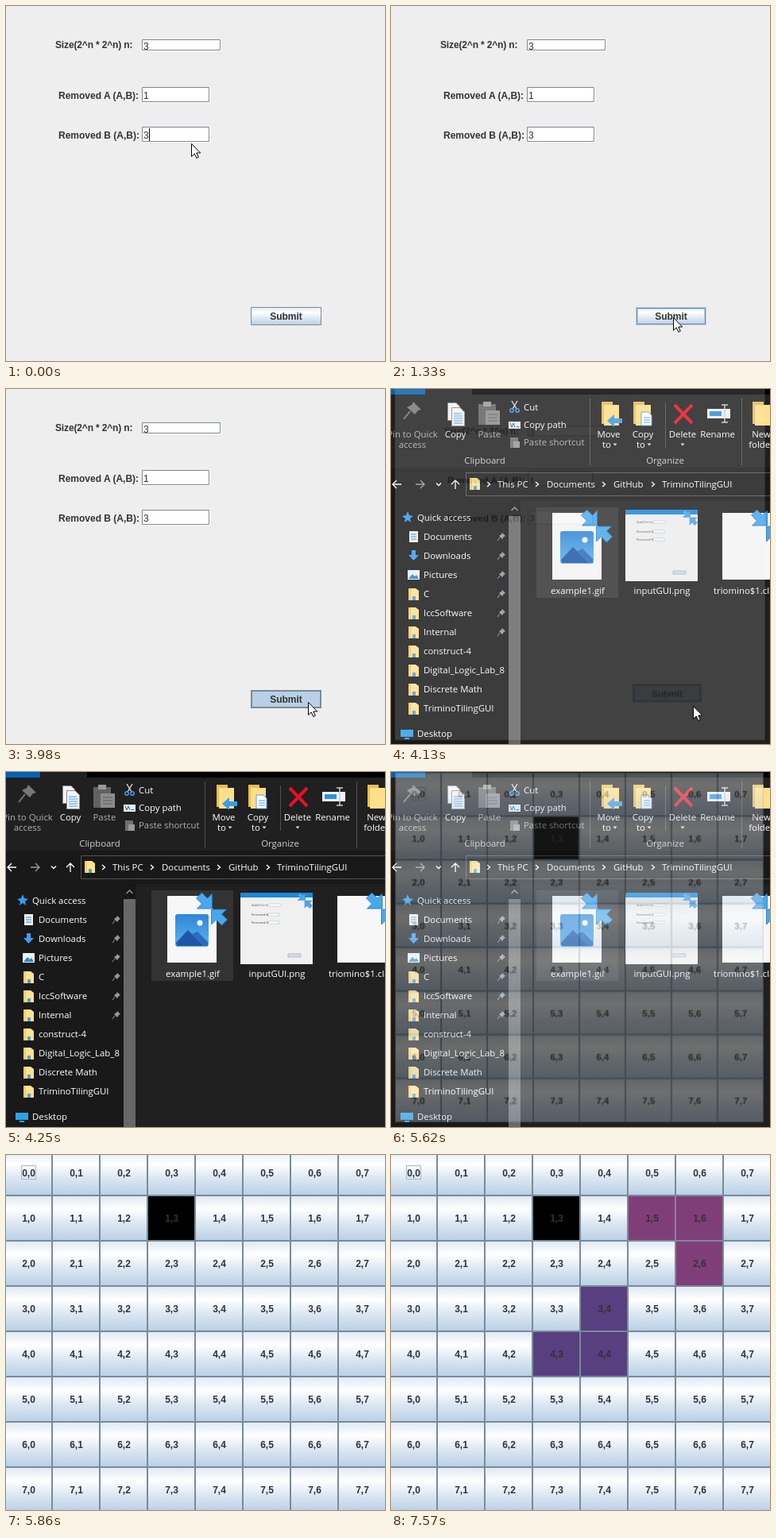
An HTML page for the animation above (8 s loop, 477 by 447 pixels).

```html
<!DOCTYPE html>
<html lang="en">
<head>
<meta charset="utf-8">
<title>Trimino tiling</title>
<style>
html, body { margin: 0; width: 100%; height: 100%; overflow: hidden; background: #202020; }
svg { display: block; }
.ui { font: 11.4px "Open Sans", "Noto Sans", sans-serif; fill: #fff; }
.swing { font: bold 12px "Liberation Sans", Arial, sans-serif; fill: #333; }
.plain { font-weight: normal; }
.mid { text-anchor: middle; }
.dim { fill: #b0b0b0; }
.group { fill: #d0d0d0; }
.tiny { font-size: 4px; fill: #444; }
.line { fill: none; stroke: #fff; stroke-width: 1.3; }
.edge { fill: none; stroke: #7a8a99; }
.glow { fill: none; stroke: #b8cfe5; }

#form, #grid, #caret, #hover, #press, #cursor, .tile { animation: 8s step-end infinite; }
#form { animation-name: close; transform-origin: 205px 165px; }
#grid { animation-name: open; transform-origin: 205px 185px; }
#caret { animation-name: blink; }
#hover { animation-name: hover; }
#press { animation-name: press; }
#cursor { animation-name: move; }
#first { animation-name: first; }
#second { animation-name: second; }

@keyframes close {
  0% { opacity: 1; transform: none; }
  51.625% { opacity: .17; transform: scale(.966); }
  53.125%, 100% { opacity: 0; transform: scale(.966); }
}
@keyframes open {
  0% { opacity: 0; transform: scale(.966); }
  70.25% { opacity: .36; transform: scale(.966); }
  71.75% { opacity: .82; transform: scale(.99); }
  73.25%, 100% { opacity: 1; transform: none; }
}
@keyframes blink {
  0%, 9.75%, 22%, 34.75%, 46.625% { opacity: 1; }
  3.375%, 16.625%, 28%, 41.625%, 49.75%, 100% { opacity: 0; }
}
@keyframes hover {
  0%, 23.5%, 100% { opacity: 0; }
  6.375%, 43.5% { opacity: 1; }
}
@keyframes press {
  0%, 53.125%, 100% { opacity: 0; }
  49.75% { opacity: 1; }
}
@keyframes first { 0% { opacity: 0; } 83.375%, 100% { opacity: 1; } }
@keyframes second { 0% { opacity: 0; } 94.625%, 100% { opacity: 1; } }
@keyframes move {
  0% { transform: translate(233px, 173px); opacity: 1; }
  1.875% { transform: translate(245px, 195px); }
  3.375% { transform: translate(275px, 252px); }
  4.875% { transform: translate(318px, 328px); }
  6.375% { transform: translate(347px, 380px); }
  7.875% { transform: translate(355px, 388px); }
  9.75% { transform: translate(355px, 389px); }
  14.75% { transform: translate(355px, 390px); }
  16.625% { transform: translate(355px, 392px); }
  22% { transform: translate(351px, 383px); }
  23.5% { transform: translate(325px, 325px); }
  25% { transform: translate(280px, 225px); }
  26.5% { transform: translate(235px, 120px); }
  28% { transform: translate(213px, 62px); }
  29.875% { transform: translate(213px, 58px); }
  31.375% { transform: translate(213px, 56px); }
  33.25% { transform: translate(272px, 145px); }
  34.75% { transform: translate(344px, 263px); }
  38.25% { transform: translate(344px, 264px); }
  39.75% { transform: translate(375px, 364px); }
  41.625% { transform: translate(375px, 377px); }
  43.5% { transform: translate(380px, 394px); }
  51.625% { transform: translate(380px, 399px); opacity: 1; }
  53.125%, 100% { transform: translate(380px, 399px); opacity: 0; }
}
</style>
</head>
<body>
<svg width="477" height="447" viewBox="0 0 477 447">
  <defs>
    <linearGradient id="ocean" x2="0" y2="1">
      <stop stop-color="#dde8f3"/>
      <stop offset=".3" stop-color="#fff"/>
      <stop offset=".6" stop-color="#dde8f3"/>
      <stop offset="1" stop-color="#b8cfe5"/>
    </linearGradient>
    <linearGradient id="sky" x2="0" y2="1">
      <stop stop-color="#2f86d6"/>
      <stop offset="1" stop-color="#5ab4f0"/>
    </linearGradient>
    <clipPath id="inner"><path d="M172 43H269V55H172Z"/></clipPath>
    <g id="folder">
      <path d="M0 0H9L13 3V15H0Z" fill="#ffe293"/>
      <path d="M0 0H3V15H0Z" fill="#f3cd6c"/>
      <path d="M5 10H9V15H5Z" fill="#5a9cc8"/>
    </g>
    <g id="bigfolder">
      <path d="M0 0H14V28H0Z" fill="#e9bd55"/>
      <path d="M3 4H22V30H3Z" fill="#ffe08a"/>
    </g>
    <g id="pin" fill="#8f9aa3">
      <path d="M1-5L5-1L3 0L1 3L-3-1L0-3Z"/>
      <path d="M-2 1L-5 5" stroke="#8f9aa3"/>
    </g>
    <path id="arrow" d="M0 0V-19L-6-13L-13-20L-20-13L-13-6L-19 0Z"/>
    <g id="squeeze" fill="#48a8ee" stroke="#1d70b8" stroke-width=".8">
      <use href="#arrow"/>
      <use href="#arrow" transform="translate(-1 1) rotate(180)"/>
    </g>
    <path id="down" d="M-2.500-1.500H2.500L0 1.500Z" fill="#ddd"/>
    <path id="next" class="line" d="M-2-3L1.500 0L-2 3"/>
  </defs>

  <g id="explorer" class="ui">
    <path d="M0 0H477V447H0Z" fill="#202020"/>
    <path d="M102 0H477V7H102Z" fill="#000"/>
    <path d="M0 0H43V7H0Z" fill="#0063b1"/>
    <path d="M0 99H477V141H0ZM0 141H148V447H0Z" fill="#191919"/>
    <path d="M148 141H163V447H148Z" fill="#171717"/>
    <path d="M148 160H163V447H148Z" fill="#686868"/>
    <path d="M151.500 153L155.500 149L159.500 153" class="line" style="stroke:#999"/>
    <path d="M250.500 12V96M441.500 12V96M345.500 17V74" stroke="#505050"/>

    <g fill="#777">
      <path d="M28 16L38 26L34 27L30 32L20 23L26 20Z"/>
      <path d="M24 28L16 38" stroke="#777" stroke-width="2"/>
    </g>
    <g fill="#f4f4f4" stroke="#8b8b8b">
      <path d="M71.500 17.500H82L86.500 22V39.500H71.500Z"/>
      <path d="M76.500 23.500H87L92.500 29V46.500H76.500Z"/>
    </g>
    <path d="M79 31H89M79 34H90M79 37H90M79 40H90M79 43H90" stroke="#4a9ae0"/>
    <path d="M110 19H132V45H110Z" fill="#626262"/>
    <path d="M116 16H126V22H116Z" fill="#999"/>
    <path d="M119 27H137V45H119Z" fill="#8c8c8c"/>
    <path d="M122 32H134M122 36H134M122 40H134" stroke="#5c5c5c"/>
    <path d="M152 15L158 25M159 15L153 25" stroke="#ddd" stroke-width="1.4"/>
    <g fill="none" stroke="#3f9be8" stroke-width="1.5">
      <circle cx="152" cy="27" r="2.200"/><circle cx="159" cy="27" r="2.200"/>
    </g>
    <path d="M148 41H163V50H148Z" fill="#e4eef5"/>
    <path d="M150 43L152 48L154 43L156 48M158 47.500H161" fill="none" stroke="#27628f"/>
    <path d="M150 61H160V74H150Z" fill="#707070"/>
    <path d="M154 66H162V74H154Z" fill="#9a9a9a"/>

    <use href="#bigfolder" x="265" y="16"/>
    <path d="M291 37H281V32L272 40L281 48V43H291Z" fill="#3b9be8"/>
    <use href="#bigfolder" x="305" y="16"/>
    <path d="M315 29H324L328 33V46H315Z" fill="#fff" stroke="#5a9fd4"/>
    <path d="M318 36H326M318 39H326M318 42H326" stroke="#4a9ae0"/>
    <path d="M357 20L379 43M379 20L357 43" stroke="#e81123" stroke-width="4"/>
    <path d="M398 25H427V37H398Z" fill="#eef4f8"/>
    <path d="M401 28H416V34H401Z" fill="#2f8fe0"/>
    <path d="M416 20H424M420 20V42M416 42H424" stroke="#ccc" stroke-width="1.500"/>
    <use href="#bigfolder" x="455" y="16"/>
    <use href="#down" x="282" y="70"/><use href="#down" x="325" y="70"/><use href="#down" x="367" y="70"/>

    <path d="M94.500 105.500H480V134.500H94.500Z" fill="none" stroke="#535353"/>
    <path class="line" d="M13 120H2M7 115L2 120L7 125M81 126V115M76 120L81 115L86 120M57 118.500L60 121.500L63 118.500"/>
    <path class="line" style="stroke:#999" d="M31 120H42M37 115L42 120L37 125"/>
    <use href="#folder" x="99" y="112"/>
    <use href="#next" x="123" y="120"/><use href="#next" x="184" y="120"/>
    <use href="#next" x="268" y="120"/><use href="#next" x="330" y="120"/>

    <path d="M21 154L23 159L28 160L24 163L25 168L21 165L17 168L18 163L14 160L19 159Z" fill="#2f9df0"/>
    <path d="M23 179H34V193H23Z" fill="#eef2f5"/>
    <path d="M25 183H32M25 186H32M25 189H32" stroke="#3d7fb0"/>
    <path d="M26 203H31V209H35L28.500 216L22 209H26Z" fill="#3d9df0"/>
    <path d="M21 228H36V240H21Z" fill="#e8f3fa"/>
    <path d="M22 239L27 233L30 236L32 234L35 239Z" fill="#2a86c8"/>
    <path d="M12 429H28V438H12Z" fill="#29a3e8"/>
    <path d="M17 440H23" stroke="#29a3e8" stroke-width="2"/>

    <path d="M183 149H286V263H183Z" fill="#333"/>
    <path d="M203 156H244V240H203ZM417 156H477V240H417Z" fill="#f7f7f7"/>
    <path d="M244 156L265 177V240H244Z" fill="#f7f7f7"/>
    <rect x="213" y="179" width="42" height="41" rx="3" fill="url(#sky)"/>
    <path d="M214 215L229 199L249 219H215Z" fill="#1f57a8"/>
    <path d="M234 204L241 201L254 214V219H249Z" fill="#2a6cc0"/>
    <circle cx="244" cy="190" r="3.500" fill="#fff"/>
    <use href="#squeeze" x="259.500" y="172"/>
    <path d="M295 152H386V242H295Z" fill="#f0f0f0"/>
    <path d="M295 152H386V158H295Z" fill="#1b87dc"/>
    <text x="309" y="169" class="tiny">Size(2^n) n:</text>
    <text x="309" y="181" class="tiny">Removed A:</text>
    <text x="309" y="191" class="tiny">Removed B:</text>
    <path d="M330 166H346V169H330ZM330 178H344V181H330ZM330 188H344V191H330Z" fill="#fff" stroke="#a9c4cc" stroke-width=".6"/>
    <path d="M355 229H371V233H355Z" fill="#d5dfe8" stroke="#8a98a5" stroke-width=".6"/>
    <use href="#squeeze" transform="translate(376.500 161.500) scale(.48)"/>
    <use href="#squeeze" x="473.500" y="172"/>
  </g>

  <g id="form" class="swing">
    <path d="M-2-6H480V452H-2Z" fill="#eee"/>
    <text x="62" y="53" letter-spacing="-.15">Size(2^n * 2^n) n:</text>
    <text x="66" y="117">Removed A (A,B):</text>
    <text x="66" y="167">Removed B (A,B):</text>
    <path d="M171 42H271V57H171ZM171 102H257V122H171ZM171 152H257V172H171Z" fill="#fff"/>
    <path class="edge" d="M171.500 42.500H269.500V55.500H171.500ZM171.500 102.500H255.500V120.500H171.500ZM171.500 152.500H255.500V170.500H171.500Z"/>
    <g class="plain">
      <text x="173" y="55" clip-path="url(#inner)">3</text>
      <text x="173" y="117">1</text>
      <text x="173" y="167">3</text>
    </g>
    <path id="caret" d="M180 154H181V170H180Z" fill="#000"/>
    <path d="M308 379H397V402H308Z" fill="url(#ocean)"/>
    <path class="edge" d="M308.500 379.500H396.500V401.500H308.500Z"/>
    <g id="hover">
      <path class="glow" d="M308.500 379.500H396.500V401.500H308.500ZM310.500 381.500H394.500V399.500H310.500Z"/>
      <path class="edge" d="M309.500 380.500H395.500V400.500H309.500Z"/>
    </g>
    <g id="press">
      <path d="M308 379H397V402H308Z" fill="#b8cfe5"/>
      <path class="edge" stroke-width="2" d="M309 380H396V401H309Z"/>
    </g>
    <text x="352.500" y="395" class="mid">Submit</text>
  </g>

  <g id="grid" class="swing">
    <g id="cells"></g>
    <g id="first" class="tile" fill="#573f80"></g>
    <g id="second" class="tile" fill="#803e79"></g>
    <g id="labels" class="mid"></g>
    <path d="M19.500 13.500H37.500V30.500H19.500Z" fill="none" stroke="#a3b8cc"/>
  </g>

  <path id="cursor" d="M.5 .5V16.500L4.200 13L6.800 18.500L9.300 17.400L6.800 12H11.700Z" fill="#fff" stroke="#000"/>
</svg>
<script>
const add = (id, markup) => document.getElementById(id).insertAdjacentHTML('beforeend', markup);
const say = (x, y, text, cls = '') => add('explorer', `<text x="${x}" y="${y}" class="${cls}">${text}</text>`);

// Ribbon
[[27, 'Pin to Quick', 'access', 'dim'], [81, 'Copy'], [124, 'Paste', '', 'dim'], [274, 'Move'], [317, 'Copy'],
 [367, 'Delete'], [411, 'Rename'], [466, 'New', 'folder']].forEach(([x, top, low = '', cls = '']) => {
  say(x, 61, top, 'mid ' + cls);
  if (low) say(x, 74, low, 'mid ' + cls);
});
say(266, 74, 'to');
say(309, 74, 'to');
say(167, 27, 'Cut');
say(167, 49, 'Copy path');
say(167, 71, 'Paste shortcut', 'dim');
say(118, 94, 'Clipboard', 'mid group');
say(345, 94, 'Organize', 'mid group');

// Address bar
[[134, 'This PC'], [196, 'Documents'], [280, 'GitHub'], [341, 'TriminoTilingGUI']]
  .forEach(([x, text]) => say(x, 124, text));

// Sidebar
say(33, 166, 'Quick access');
['Documents', 'Downloads', 'Pictures', 'C', 'IccSoftware', 'Internal', 'construct-4',
 'Digital_Logic_Lab_8', 'Discrete Math', 'TriminoTilingGUI'].forEach((name, i) => {
  const y = 186 + i * 24;
  say(41, y + 4, name);
  if (i > 2) add('explorer', `<use href="#folder" x="22" y="${y - 7}"/>`);
  if (i < 6) add('explorer', `<use href="#pin" x="139" y="${y}"/>`);
});
say(33, 438, 'Desktop');

// Files
say(235, 258, 'example1.gif', 'mid');
say(341, 258, 'inputGUI.png', 'mid');
say(406, 258, 'triomino$1.class');

// Board
const left = col => col * 60 - 2;
const upper = row => row * 57 - 6;
const fill = (id, row, col) =>
  add(id, `<rect x="${left(col) + 1}" y="${upper(row) + 1}" width="58" height="55"/>`);
for (let row = 0; row < 8; row++) {
  for (let col = 0; col < 8; col++) {
    const x = left(col), y = upper(row);
    const paint = row === 1 && col === 3 ? '#000' : 'url(#ocean)';
    add('cells', `<rect x="${x}" y="${y}" width="60" height="57" fill="${paint}"/>
      <rect x="${x + .5}" y="${y + .5}" width="59" height="56" class="edge"/>`);
    add('labels', `<text x="${x + 30.5}" y="${y + 33}">${row},${col}</text>`);
  }
}
[[3, 4], [4, 3], [4, 4]].forEach(([row, col]) => fill('first', row, col));
[[1, 5], [1, 6], [2, 6]].forEach(([row, col]) => fill('second', row, col));
</script>
</body>
</html>
```
